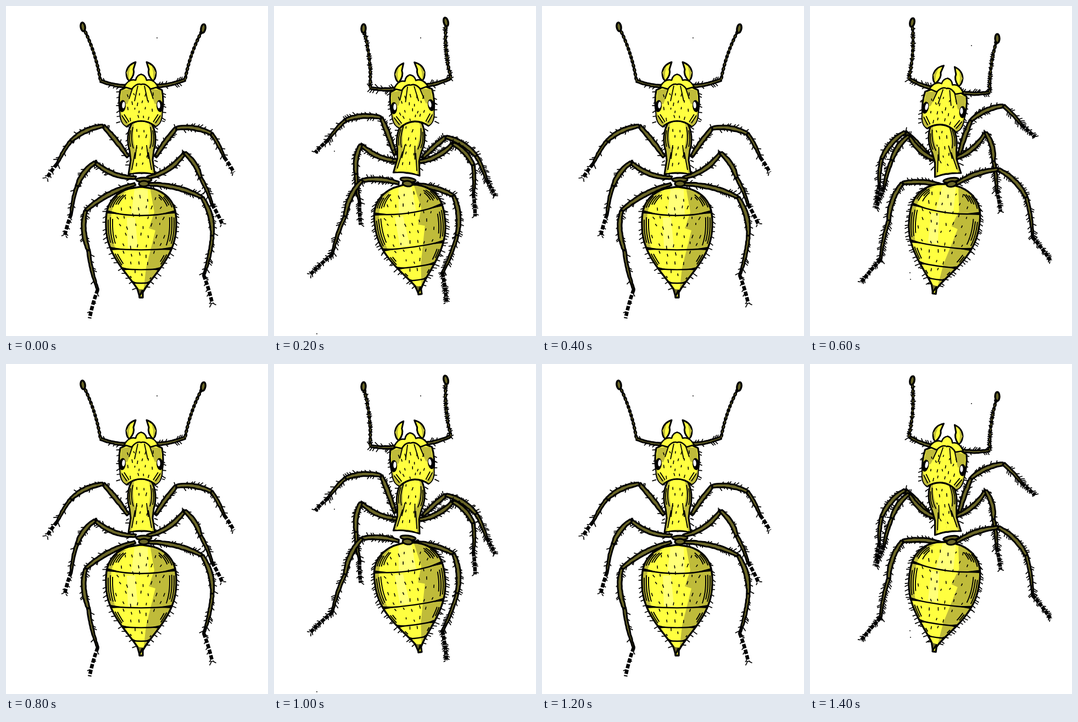
An HTML page with a canvas for the animation above (1600 ms loop, 477 by 600 pixels).

```html
<!DOCTYPE html>
<html lang="en">
<head>
<meta charset="utf-8">
<title>Walking ant</title>
<style>
html, body { margin: 0; width: 100%; height: 100%; overflow: hidden; background: #fff; }
canvas { display: block; }
</style>
</head>
<body>
<canvas id="stage" width="477" height="600"></canvas>
<script>
const ctx = document.getElementById('stage').getContext('2d');
const INK = '#000', YELLOW = '#ffff40', PALE = '#ffff78', SHADE = '#bfbb3a', OLIVE = '#6b6728';
const STEP = 200, ORDER = [0, 1, 0, 2];

// Proportions shared by the left and right leg of each pair.
const PAIRS = [
  { rootX: 25, rootY: 16, tibia: 65, foot: 81, femurBow: .02, footBow: .02 },
  { rootX: 11, rootY: 25, tibia: 54, foot: 93, femurBow: -.1, footBow: .02 },
  { rootX: 12, rootY: 66, tibia: 72, foot: 124, femurBow: .06, footBow: .13 }
];

// Body parts: shift x, shift y, turn. Legs: knee x, knee y, tibia and foot angles in degrees.
// Feelers: elbow and club. Hip: extra drop of the middle legs' roots.
const POSES = [
  { head: [0, 0, 0], thorax: [0, 0, 0], gaster: [0, 0, 0], hip: 29,
    left: [[177, 218, 155, 123], [162, 284, 127, 104], [145, 372, 86, 89]],
    right: [[310, 222, 9, 60], [325, 267, 57, 65], [357, 348, 75, 90]],
    feelers: [[172, 136, 140, 38], [326, 134, 359, 41]], specks: [[275, 58]] },
  { head: [6, 1, -.08], thorax: [0, 0, .12], gaster: [6, -5, -.14], hip: 0,
    left: [[195, 203, 176, 133], [158, 252, 99, 85], [160, 317, 115, 121]],
    right: [[313, 238, 32, 65], [326, 250, 47, 88], [327, 345, 85, 99]],
    feelers: [[175, 149, 163, 41], [322, 131, 313, 29]], specks: [[267, 58], [110, 264], [78, 596]] },
  { head: [-2, 7, .12], thorax: [-3, 2, -.15], gaster: [-6, -6, .14], hip: -4,
    left: [[173, 229, 131, 97], [180, 236, 125, 108], [168, 322, 110, 114]],
    right: [[293, 208, -24, 45], [320, 230, 75, 82], [343, 297, 45, 69]],
    feelers: [[180, 132, 186, 30], [327, 157, 341, 59]], specks: [[294, 72], [182, 485], [183, 497]] }
];
const PIVOT = { head: [246, 181], thorax: [247, 258], gaster: [246, 430] };

let seed, fuzz;
const rnd = () => (seed = seed * 16807 % 2147483647) / 2147483647;
const around = r => (rnd() * 2 - 1) * r;

function shape(d, fill, width, ink = INK) {
  const p = new Path2D(d);
  if (fill) { ctx.fillStyle = fill; ctx.fill(p); }
  if (width) { ctx.strokeStyle = ink; ctx.lineWidth = width; ctx.stroke(p); }
}

const poly = pts => 'M' + pts.map(p => p[0].toFixed(2) + ' ' + p[1].toFixed(2)).join('L');
const line = (x, y, dx, dy, width) => shape(poly([[x, y], [x + dx, y + dy]]), null, width);

function oval(x, y, rx, ry, turn, fill, width) {
  ctx.beginPath();
  ctx.ellipse(x, y, rx, ry, turn, 0, 7);
  ctx.fillStyle = fill;
  ctx.fill();
  if (width) { ctx.strokeStyle = INK; ctx.lineWidth = width; ctx.stroke(); }
}

// Runs a drawing twice, mirrored about x = 0.
function both(draw) {
  for (const s of [-1, 1]) {
    ctx.save();
    ctx.scale(s, 1);
    draw();
    ctx.restore();
  }
}

// Maps a point of a body part to the stage.
function place(pose, name, x, y) {
  const [dx, dy, turn] = pose[name], [px, py] = PIVOT[name];
  const c = Math.cos(turn), s = Math.sin(turn);
  return [px + dx + x * c - y * s, py + dy + x * s + y * c];
}

function part(pose, name, draw) {
  ctx.save();
  ctx.translate(...place(pose, name, 0, 0));
  ctx.rotate(pose[name][2]);
  draw();
  ctx.restore();
}

// Points from a to b, bowed sideways by a share of the length, with the unit direction.
function bowed(a, b, bow) {
  const dx = b[0] - a[0], dy = b[1] - a[1], len = Math.hypot(dx, dy);
  const n = Math.max(4, Math.round(len / 4)), pts = [];
  for (let i = 0; i <= n; i++) {
    const t = i / n, k = bow * 4 * t * (1 - t);
    pts.push([a[0] + dx * t - dy * k, a[1] + dy * t + dx * k, dx / len, dy / len]);
  }
  return pts;
}

function hairs(pts, share, reach) {
  for (const [x, y, ux, uy] of pts) {
    for (const s of [-1, 1]) {
      if (rnd() > share) continue;
      const lean = .5 + rnd() * .5, len = reach * (.7 + rnd() * .5);
      line(x - uy * s * 2, y + ux * s * 2, (ux * lean - uy * s) * len, (uy * lean + ux * s) * len, 1.7);
    }
  }
}

function limb(a, b, bow, w0, w1, w2) {
  const pts = bowed(a, b, bow), n = pts.length - 1;
  const side = s => pts.map(([x, y, ux, uy], i) => {
    const t = i / n, w = s * (w0 + (w2 - w0) * t + (w1 - (w0 + w2) / 2) * 4 * t * (1 - t) + around(.4));
    return [x - uy * w, y + ux * w];
  });
  hairs(pts.slice(1), fuzz ? .55 : .3, 6);
  shape(poly([...side(1), ...side(-1).reverse()]) + 'Z', OLIVE, 3);
}

const ahead = ([x, y], deg, len) => [x + len * Math.cos(deg * Math.PI / 180), y + len * Math.sin(deg * Math.PI / 180)];

function leg(root, [kx, ky, tibiaTurn, footTurn], pair, side) {
  const knee = [kx, ky];
  const joint = ahead(knee, tibiaTurn, pair.tibia), tip = ahead(joint, footTurn, pair.foot);
  const path = bowed(joint, tip, -pair.footBow * side);
  const ankle = path[Math.round(path.length * .56)];
  limb(root, knee, pair.femurBow * side, 2.4, 3.8, 2.8);
  limb(knee, joint, .08 * side, 2.8, 3.8, 2.8);
  limb(joint, ankle, .03 * side, 2.6, 2.4, 1.4);
  const foot = bowed(ankle, tip, .02 * side);
  ctx.setLineDash([8, fuzz ? 1 : 2.5]);
  shape(poly(foot), null, 6.5);
  ctx.setLineDash([]);
  hairs(foot, fuzz ? .6 : .3, 4);
}

function feeler(base, [ex, ey, cx, cy], side) {
  limb(base, [ex, ey], -.05 * side, 3, 2.4, 2);
  const whip = bowed([ex, ey], [cx, cy], .04 * side);
  const turn = Math.atan2(cy - ey, cx - ex);
  shape(poly(whip), null, 4.2);
  whip.forEach(([x, y], i) => { if (i % 2) oval(x, y, 4, 3.2, turn, INK); });
  ctx.setLineDash([4, 5]);
  shape(poly(whip), null, 1.5, OLIVE);
  ctx.setLineDash([]);
  if (fuzz) hairs(whip, .5, 2.5);
  oval(cx, cy, 8, 4, turn + .15 * side, OLIVE, 3.4);
}

function ticks(y0, y1, gap, width) {
  for (let y = y0, row = 0; y < y1; y += gap, row++) {
    const w = width(y);
    for (let x = -w + (row % 2) * 6; x < w; x += gap * .85) {
      line(x + around(2), y + around(4), x * -.05 + around(1.5), 5 + around(1.5), 1.6);
    }
  }
}

function fringe(y0, y1, gap, width) {
  for (let y = y0; y < y1; y += gap) {
    for (const s of [-1, 1]) line(s * width(y), y + around(3), s * (5 + rnd() * 3), 3 + around(3), 1.7);
  }
}

// Abdomen: an egg with a round top and a pointed end, widest at WIDEST.
const TOP = -101, WIDEST = -35, END = 100;
function half(y) {
  const up = (WIDEST - y) / (WIDEST - TOP), down = (y - WIDEST) / (END - WIDEST);
  return Math.max(3, 64 * (y < WIDEST ? Math.sqrt(1 - up ** 2.6) : (1 - down ** 2.3) ** 1.6));
}
function edge(side, inset, from, to) {
  const pts = [];
  for (let y = from; y <= to; y += 3) pts.push([side * Math.max(1, half(y) - inset), y]);
  return pts;
}

function gaster() {
  const bands = [-56, 11, 48, 73];
  fringe(-90, 88, fuzz ? 6 : 9, half);
  const outline = poly([...edge(-1, 0, TOP, END), ...edge(1, 0, TOP, END).reverse()]) + 'Z';
  shape(outline, YELLOW);
  ctx.save();
  ctx.clip(new Path2D(outline));
  shape('M-12 -97H12L14 -50H-18ZM-26 -45H-11L-6 10H-24Z', PALE);
  shape('M16 -101L24 -55L14 -26L26 -22L18 10L9 46L3 100H80V-101Z', SHADE);
  shape(poly([...edge(-1, -2, -92, 12), ...edge(-1, 9, -92, 12).reverse()]) + 'Z', SHADE);
  bands.forEach((y, i) => {
    const from = i ? bands[i - 1] + 9 : -88;
    for (const s of [-1, 1]) {
      for (let k = 4; k < 17 - i * 3; k += 4) {
        shape(poly(edge(s, k, from + rnd() * 7, y - 5 - rnd() * k)), null, 1.9);
      }
    }
    const w = half(y), sag = 14 / (1 + 2 * i);
    shape(`M${-w} ${y}Q0 ${y + sag} ${w} ${y}`, null, 2.4);
    both(() => shape(`M${w} ${y - 3}L${w / 2} ${y + sag * .38}L${w} ${y + 3}Z`, INK));
  });
  ticks(-83, 70, 17, y => half(y) - 18);
  ctx.restore();
  shape(outline, null, 3.4);
  shape('M-7 84L-3 98L3 86', OLIVE, 3);
}

function thorax() {
  oval(4, 58, 14, 4, 0, OLIVE, 3);
  oval(4, 65, 9, 5, 0, OLIVE, 3);
  fringe(-38, 40, 10, () => 23);
  both(() => {
    shape('M-1 -51Q15 -51 18 -45Q30 -22 22 5L20 22L24 48Q10 45 -1 46', SHADE, 3);
    shape('M-1 -50Q13 -50 14 -42Q18 -20 11 5L19 46Q8 43 -1 43', YELLOW);
    shape('M16 -38Q21 -15 15 1M20 -32Q24 -16 20 -2M12 8L18 40M9 -5L12 20', null, 1.8);
  });
  ticks(-36, 36, 15, () => 10);
}

function head() {
  fringe(-25, 35, 9, () => 38);
  both(() => {
    shape('M10 -79Q25 -74 27 -60Q27 -48 21 -45Q11 -56 14 -66Z', YELLOW, 3);
    shape('M19 -73L27 -60L22 -46L22 -60Z', SHADE);
    shape('M-1 -40Q16 -40 38 -28Q42 -8 38 14Q38 32 26 38Q14 28 -1 28', YELLOW, 3.2);
    shape('M14 -31L36 -28L38 -2L25 -3ZM38 8L32 24L22 31L26 37Q38 34 38 8Z', SHADE);
    shape('M-1 -57Q8 -56 10 -46Q22 -50 31 -34L17 -30Q8 -42 -1 -38', YELLOW, 2.6);
    shape('M6 -36L12 -8M16 -31L22 -12M35 18L26 32M31 16L22 30', null, 1.8);
    oval(34, 1, 6, 11, -.1, INK);
    oval(32, -1, 2.7, 6, -.1, '#fff');
  });
  ticks(-20, 24, 13, () => 24);
}

function drawAnt(index) {
  const pose = POSES[index];
  seed = 4711 + index;
  fuzz = index > 0;
  ctx.clearRect(0, 0, 477, 600);
  for (const [x, y] of pose.specks) oval(x, y, .9, .9, 0, INK);
  PAIRS.forEach((pair, i) => {
    const y = pair.rootY + (i === 1 ? pose.hip : 0);
    leg(place(pose, 'thorax', -pair.rootX, y), pose.left[i], pair, 1);
    leg(place(pose, 'thorax', pair.rootX, y), pose.right[i], pair, -1);
  });
  pose.feelers.forEach((f, i) => feeler(place(pose, 'head', i ? 16 : -16, -35), f, i ? -1 : 1));
  part(pose, 'gaster', gaster);
  part(pose, 'thorax', thorax);
  part(pose, 'head', head);
}

ctx.lineJoin = 'round';
const start = performance.now();
let shown = -1;
function tick() {
  const index = ORDER[Math.floor((performance.now() - start) / STEP) % ORDER.length];
  if (index !== shown) drawAnt(shown = index);
  requestAnimationFrame(tick);
}
tick();
</script>
</body>
</html>
```
